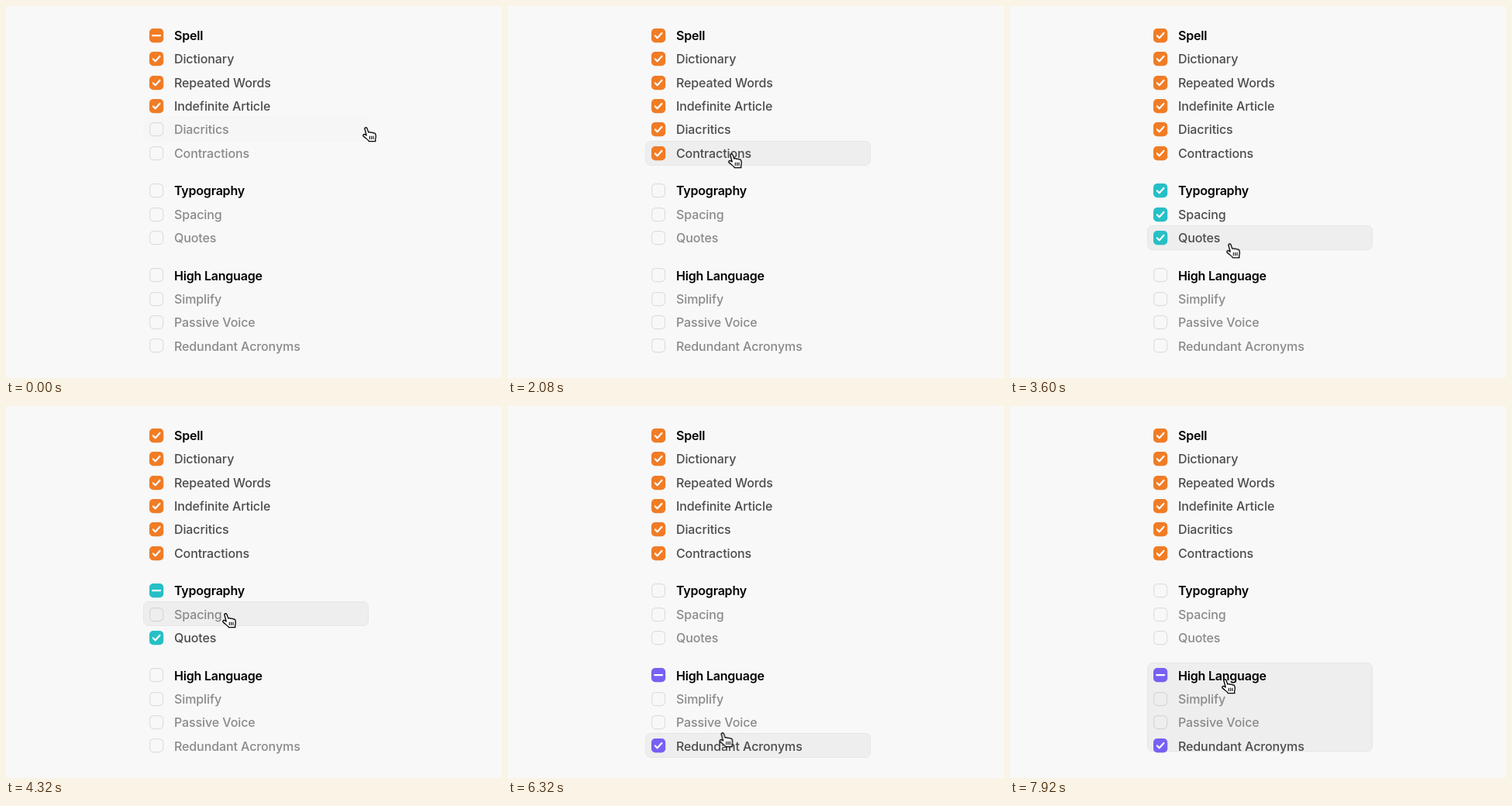
Write an HTML page that moves like this. It is 640 px wide and 480 px high and loops after 8000 ms.

```html
<!DOCTYPE html>
<html lang="en">
<head>
<meta charset="utf-8">
<title>Nested checkboxes</title>
<style>
@property --on { syntax: "<number>"; inherits: true; initial-value: 0; }

html, body { margin: 0; width: 100%; height: 100%; overflow: hidden; background: #f8f8f8; }
.stage { position: relative; width: 640px; height: 480px; overflow: hidden; }
.stage, .stage * { animation: 8s linear infinite; }

.group { position: absolute; left: 185.4px; }
.row {
  display: flex; align-items: center; height: 30.33px; white-space: nowrap;
  font: 450 16px Inter, sans-serif; letter-spacing: -.006em;
}
.row span {
  margin-left: 13.4px;
  --g: calc(138 - 62 * var(--on));
  color: rgb(var(--g), var(--g), var(--g));
}
.row.head span { font-weight: 600; letter-spacing: -.013em; color: #000; }
.row svg { width: 18.2px; height: 18.2px; overflow: visible; }
.edge { fill: none; stroke: rgba(0, 0, 0, .105); stroke-width: 1.1; }
.fill { opacity: var(--on); }
.mark {
  fill: none; stroke: #fff; stroke-width: 2.2; stroke-linecap: round; stroke-linejoin: round;
  d: path("M -4.2 0.3 L -1.4 3.2 L 4.3 -3.2");
}
.on { --on: 1; }

.hover {
  position: absolute; left: 177px; width: 291px; box-sizing: border-box;
  background: #eee; border: 1px solid #e6e6e6; border-radius: 7px;
  animation-name: hover;
}
.pointer { position: absolute; left: 0; top: 0; width: 1px; height: 1px; overflow: visible; animation-name: pointer; }
.ring { fill: none; stroke: #000; stroke-width: 1.7; animation-name: ring; animation-timing-function: step-end; }

.diacritics { animation-name: diacritics; }
.contractions { animation-name: contractions; }
.typography { animation-name: typography; }
.spacing { animation-name: spacing; }
.quotes { animation-name: typography; }
.high { animation-name: redundant; }
.simplify { animation-name: simplify; }
.passive { animation-name: passive; }
.redundant { animation-name: redundant; }
.spell .mark { animation-name: spell-mark; }
.typography .mark { animation-name: typography-mark; }
.high .mark { animation-name: high-mark; }

@keyframes diacritics { 0%, 16.3% { --on: 0 } 18.5%, 100% { --on: 1 } }
@keyframes contractions { 0%, 21.4% { --on: 0 } 23.6%, 100% { --on: 1 } }
@keyframes typography { 0%, 38.2% { --on: 0 } 40.4%, 60% { --on: 1 } 62.5%, 100% { --on: 0 } }
@keyframes spacing { 0%, 38.2% { --on: 0 } 40.4%, 51.8% { --on: 1 } 53.8%, 100% { --on: 0 } }
@keyframes redundant { 0%, 76.2% { --on: 0 } 78.2%, 100% { --on: 1 } }
@keyframes passive { 0%, 79.3% { --on: 0 } 81.3%, 91% { --on: 1 } 93%, 100% { --on: 0 } }
@keyframes simplify { 0%, 82.3% { --on: 0 } 84.3%, 86.6% { --on: 1 } 88.2%, 100% { --on: 0 } }

@keyframes spell-mark {
  0%, 22% { d: path("M -5 0 L 0 0 L 5 0") }
  24.4%, 100% { d: path("M -4.2 0.3 L -1.4 3.2 L 4.3 -3.2") }
}
@keyframes typography-mark {
  0%, 51.8% { d: path("M -4.2 0.3 L -1.4 3.2 L 4.3 -3.2") }
  53.8%, 100% { d: path("M -5 0 L 0 0 L 5 0") }
}
@keyframes high-mark {
  0%, 82.3% { d: path("M -5 0 L 0 0 L 5 0") }
  84.3%, 86.6% { d: path("M -4.2 0.3 L -1.4 3.2 L 4.3 -3.2") }
  88.3%, 100% { d: path("M -5 0 L 0 0 L 5 0") }
}

@keyframes hover {
  0% { top: 143.3px; height: 32px; opacity: .12 }
  2%, 21% { top: 143.3px; height: 32px; opacity: 1 }
  23%, 30.3% { top: 173.7px; height: 32px }
  32.3%, 41% { top: 222px; height: 92.5px }
  42.5%, 43% { top: 252.4px; height: 32px }
  45%, 50% { top: 282.7px; height: 32px }
  51.6%, 57% { top: 252.4px; height: 32px }
  59%, 70% { top: 282.7px; height: 32px }
  71.2% { top: 331.2px; height: 123px }
  72% { top: 361.5px; height: 32px }
  72.8% { top: 391.9px; height: 32px }
  74%, 79% { top: 422.2px; height: 32px }
  80.6%, 82% { top: 391.9px; height: 32px }
  83.8%, 90.7% { top: 361.5px; height: 32px }
  92.5%, 96% { top: 391.9px; height: 32px }
  97.3%, 97.8% { top: 361.5px; height: 32px }
  99% { top: 331.2px; height: 115px }
  100% { top: 331.2px; height: 123px; opacity: 1 }
}

@keyframes pointer {
  0% { transform: translate(467px, 157px); animation-timing-function: cubic-bezier(.3, .15, .4, 1) }
  15.6%, 16.6% { transform: translate(291px, 157px); animation-timing-function: ease-in-out }
  22% { transform: translate(291px, 178px) }
  25% { transform: translate(291px, 190px); animation-timing-function: ease-in-out }
  35%, 39% { transform: translate(288px, 240px); animation-timing-function: ease-in-out }
  45.8%, 49.2% { transform: translate(286px, 309px); animation-timing-function: ease-in-out }
  51.5%, 54.3% { transform: translate(286px, 268px); animation-timing-function: ease-in-out }
  59.8%, 68.8% { transform: translate(284px, 298px); animation-timing-function: ease-in-out }
  74%, 76% { transform: translate(280px, 433px); animation-timing-function: ease-in-out }
  86%, 88.2% { transform: translate(277px, 375px); animation-timing-function: ease-in-out }
  93.5%, 94.4% { transform: translate(278px, 414px); animation-timing-function: ease-in-out }
  99% { transform: translate(280px, 353px) }
  100% { transform: translate(280px, 351px) }
}

@keyframes ring {
  0%, 16.9%, 38.9%, 52.6%, 87.9%, 100% { opacity: 0 }
  15.9%, 37.9%, 51.6%, 86.9% { opacity: 1 }
}
</style>
</head>
<body>
<div class="stage">
  <div class="hover"></div>
  <div id="list"></div>
  <svg class="pointer">
    <path d="M-4.1 1.5C-4.4-.5-1.7-.9-1 1L.8 6.1C1.8 5.2 3.4 5.4 3.9 6.5C4.9 5.7 6.5 6 7 7.1C8.3 6.5 9.6 7.1 9.9 8.5C10.5 11 10.4 13 9.6 15L9.8 17.6H1.2L.7 16.4C-1.2 15-3 13-5.4 11.4C-7.2 10-5.6 8-3.8 8.7L-1.8 10Z"
      fill="#fff" stroke="#000" stroke-width="1.3" stroke-linejoin="round"/>
    <path d="M2.3 11v3.6M4.7 11v3.6M7 11v3.6" stroke="#000" stroke-width="1.1" stroke-linecap="round"/>
    <circle class="ring" r="34.2"/>
  </svg>
</div>
<script>
// Each item: label and state class; the first of a group is its header.
const groups = [
  { top: 23, color: "#f07c26", items: [
    ["Spell", "spell on"], ["Dictionary", "on"], ["Repeated Words", "on"],
    ["Indefinite Article", "on"], ["Diacritics", "diacritics"], ["Contractions", "contractions"]] },
  { top: 223.3, color: "#27bfc6", items: [
    ["Typography", "typography"], ["Spacing", "spacing"], ["Quotes", "quotes"]] },
  { top: 332.4, color: "#7860f2", items: [
    ["High Language", "high"], ["Simplify", "simplify"],
    ["Passive Voice", "passive"], ["Redundant Acronyms", "redundant"]] }
];

const row = (color, [label, state], i) => `
  <div class="row ${state} ${i ? "" : "head"}">
    <svg viewBox="-9.1 -9.1 18.2 18.2">
      <rect class="edge" x="-8.5" y="-8.5" width="17" height="17" rx="4.8"/>
      <g class="fill">
        <rect x="-9.1" y="-9.1" width="18.2" height="18.2" rx="5" fill="${color}"/>
        <path class="mark"/>
      </g>
    </svg>
    <span>${label}</span>
  </div>`;

document.getElementById("list").innerHTML = groups.map(g => `
  <div class="group" style="top:${g.top}px">
    ${g.items.map((item, i) => row(g.color, item, i)).join("")}
  </div>`).join("");
</script>
</body>
</html>
```
